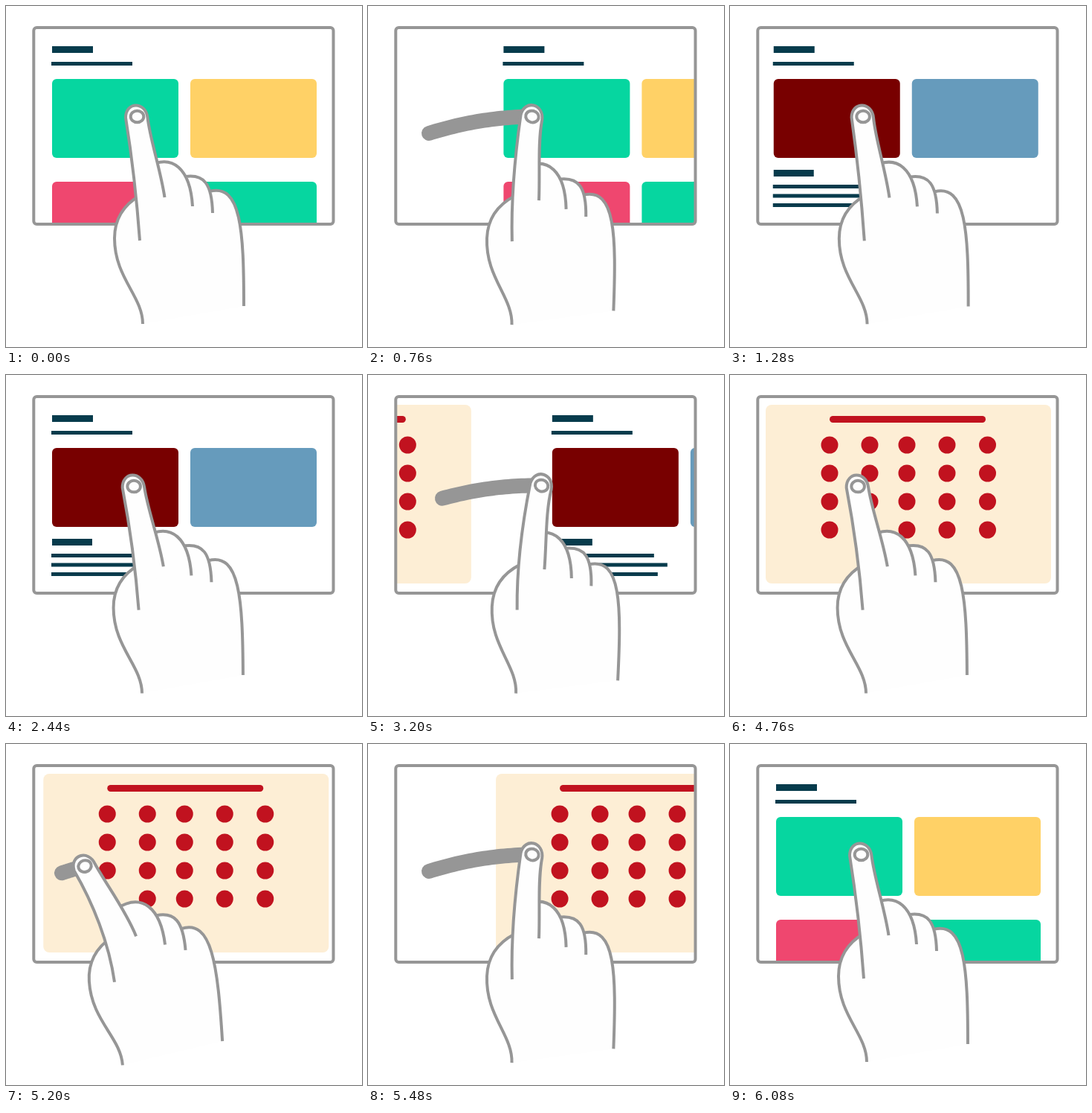
Write an HTML page with a canvas that moves like this. It is 479 px wide and 458 px high and loops after 7120 ms.

```html
<!DOCTYPE html>
<html lang="en">
<head>
<meta charset="utf-8">
<title>Swipe between pages</title>
<style>
  html, body { margin: 0; width: 100%; height: 100%; overflow: hidden; background: #fff; }
  canvas { display: block; }
</style>
</head>
<body>
<canvas width="479" height="458"></canvas>
<script>
const ctx = document.querySelector('canvas').getContext('2d');
const LOOP = 7120, STEP = 40;
const GRAY = '#969696', NAVY = '#073b4c', GREEN = '#06d6a0', RED = '#c1121f';

const clamp = (u, low = 0, high = 1) => Math.min(high, Math.max(low, u));
const progress = (t, from, to) => clamp((t - from) / (to - from));
const smooth = u => u * u * (3 - 2 * u);
const cubic = u => u < .5 ? 4 * u ** 3 : 1 - 4 * (1 - u) ** 3;
const mix = (a, b, u) => a + (b - a) * u;

function box(x, y, w, h, color, radius = 0) {
  ctx.fillStyle = color;
  ctx.beginPath();
  ctx.roundRect(x, y, w, h, radius);
  ctx.fill();
}

function heading() {
  box(62, 54, 55, 9, NAVY);
  box(61, 75, 109, 5, NAVY);
}

function cards(y, left, right) {
  box(62, y, 170, 106, left, 6);
  box(248, y, 170, 106, right, 6);
}

function galleryPage() {
  heading();
  cards(98, GREEN, '#ffd166');
  cards(236, '#ef476f', GREEN);
}

function articlePage() {
  heading();
  cards(98, '#780000', '#669bbc');
  box(62, 220, 54, 9, NAVY);
  [138, 156, 143].forEach((width, i) => box(61, 240 + 12.5 * i, width, 5, NAVY));
}

function dotsPage() {
  box(48, 40, 384, 240, '#fdeed5', 8);
  box(134, 55, 210, 9, RED, 4.5);
  for (const x of [134, 188, 238, 292, 346.5])
    for (let row = 0; row < 4; row++)
      box(x - 11.5, 82.5 + 38 * row, 23, 23, RED, 11.5);
}

// Each swipe: when it begins, the slide's time span, its distance and the two pages.
const swipes = [
  { begin: 0, from: 360, to: 1400, distance: 529, out: galleryPage, into: articlePage },
  { begin: 2400, from: 358, to: 1320, distance: 479, out: articlePage, into: dotsPage },
  { begin: 4720, from: 380, to: 1360, distance: 532, out: dotsPage, into: galleryPage }
];

function drawScreen(swipe, t) {
  const shift = swipe.distance * cubic(progress(t, swipe.from, swipe.to));
  ctx.save();
  ctx.beginPath();
  ctx.rect(39, 31, 400, 260.5);
  ctx.clip();
  ctx.translate(shift, 0);
  swipe.out();
  ctx.translate(-swipe.distance, 0);
  swipe.into();
  ctx.restore();

  ctx.strokeStyle = GRAY;
  ctx.lineWidth = 4;
  ctx.beginPath();
  ctx.roundRect(37.3, 29, 403.2, 264, 4);
  ctx.stroke();
}

// Fingertip path: wind up to the left, swipe along an arc, return to rest.
const REST = [176.5, 148.5], LEFT = 75, RIGHT = 252;
const arcY = x => 148.5 + .0011 * (225 - x) ** 2;
const swipeX = t => mix(LEFT, RIGHT, smooth(progress(t, 320, 920)));
const between = (a, b, u) => a.map((value, i) => mix(value, b[i], u));

function fingertip(t) {
  if (t < 320) return between(REST, [LEFT, arcY(LEFT)], smooth(t / 320));
  if (t < 960) return [swipeX(t), arcY(swipeX(t))];
  return between([RIGHT, arcY(RIGHT)], REST, smooth(progress(t, 960, 1320)));
}

function drawTrail(t) {
  const head = swipeX(t);
  const tail = mix(LEFT, RIGHT, cubic(progress(t, 684, 1038)));
  if (t < 320 || tail >= head) return;
  ctx.strokeStyle = GRAY;
  ctx.lineWidth = 20;
  ctx.lineCap = 'round';
  ctx.beginPath();
  for (let i = 0; i <= 30; i++) {
    const x = mix(tail, head, i / 30);
    ctx.lineTo(x, arcY(x));
  }
  ctx.stroke();
  ctx.lineCap = 'butt';
}

// Bezier curves of the resting hand: a start point, then three points per segment.
const BASE = [198, 262], WRIST = [250, 415];
const palm = [
  [[184, 427], [184, 390], [146, 365], [146, 312], [146, 285], [160, 266], [181, 254]],
  [[188, 217], [225, 196], [248, 220], [251, 269]],
  [[242, 229], [266, 226], [277, 238], [278, 278]],
  [[274, 249], [316, 238], [320, 300], [320, 403]]
];
const indexFinger = [[180, 315], [176, 260], [169, 200], [161, 150], [161, 128], [188, 128],
  [190.5, 150], [194, 180], [208, 220], [213.5, 257]];

function rotate([x, y], [cx, cy], angle) {
  const c = Math.cos(angle), s = Math.sin(angle), dx = x - cx, dy = y - cy;
  return [cx + dx * c - dy * s, cy + dx * s + dy * c];
}

function trace(points, joined) {
  ctx[joined ? 'lineTo' : 'moveTo'](...points[0]);
  for (let i = 1; i < points.length; i += 3)
    ctx.bezierCurveTo(...points.slice(i, i + 3).flat());
}

function drawHand(t) {
  const tip = fingertip(t);
  const reach = tip[0] - REST[0], degree = Math.PI / 180;
  const lean = reach * .05 * degree;
  const bend = clamp(reach * .27, -14, 14) * degree;
  const bent = p => rotate(p, BASE, bend * Math.sqrt(clamp((290 - p[1]) / 140)));

  // The hand leans at the wrist, then moves so that the bent finger meets its path.
  const leaningTip = rotate(bent(REST), WRIST, lean);
  const place = p => rotate(p, WRIST, lean).map((v, i) => v + tip[i] - leaningTip[i]);
  const lines = palm.map(line => line.map(place));

  ctx.fillStyle = '#fefefe';
  ctx.strokeStyle = GRAY;
  ctx.lineWidth = 4;
  ctx.beginPath();
  lines.forEach((line, i) => trace(line, i > 0));
  ctx.fill();
  ctx.beginPath();
  lines.forEach(line => trace(line));
  ctx.stroke();

  ctx.beginPath();
  trace(indexFinger.map(p => place(bent(p))));
  ctx.fill();
  ctx.stroke();

  ctx.beginPath();
  ctx.ellipse(...tip, 8.8, 7.8, lean + bend, 0, 2 * Math.PI);
  ctx.stroke();
}

function draw(now) {
  const time = Math.floor((now % LOOP) / STEP) * STEP;
  const swipe = swipes.findLast(s => time >= s.begin);
  const t = time - swipe.begin;
  ctx.fillStyle = '#fff';
  ctx.fillRect(0, 0, 479, 458);
  drawScreen(swipe, t);
  drawTrail(t);
  drawHand(t);
}

const start = performance.now();
function tick() {
  draw(performance.now() - start);
  requestAnimationFrame(tick);
}
tick();
</script>
</body>
</html>
```
